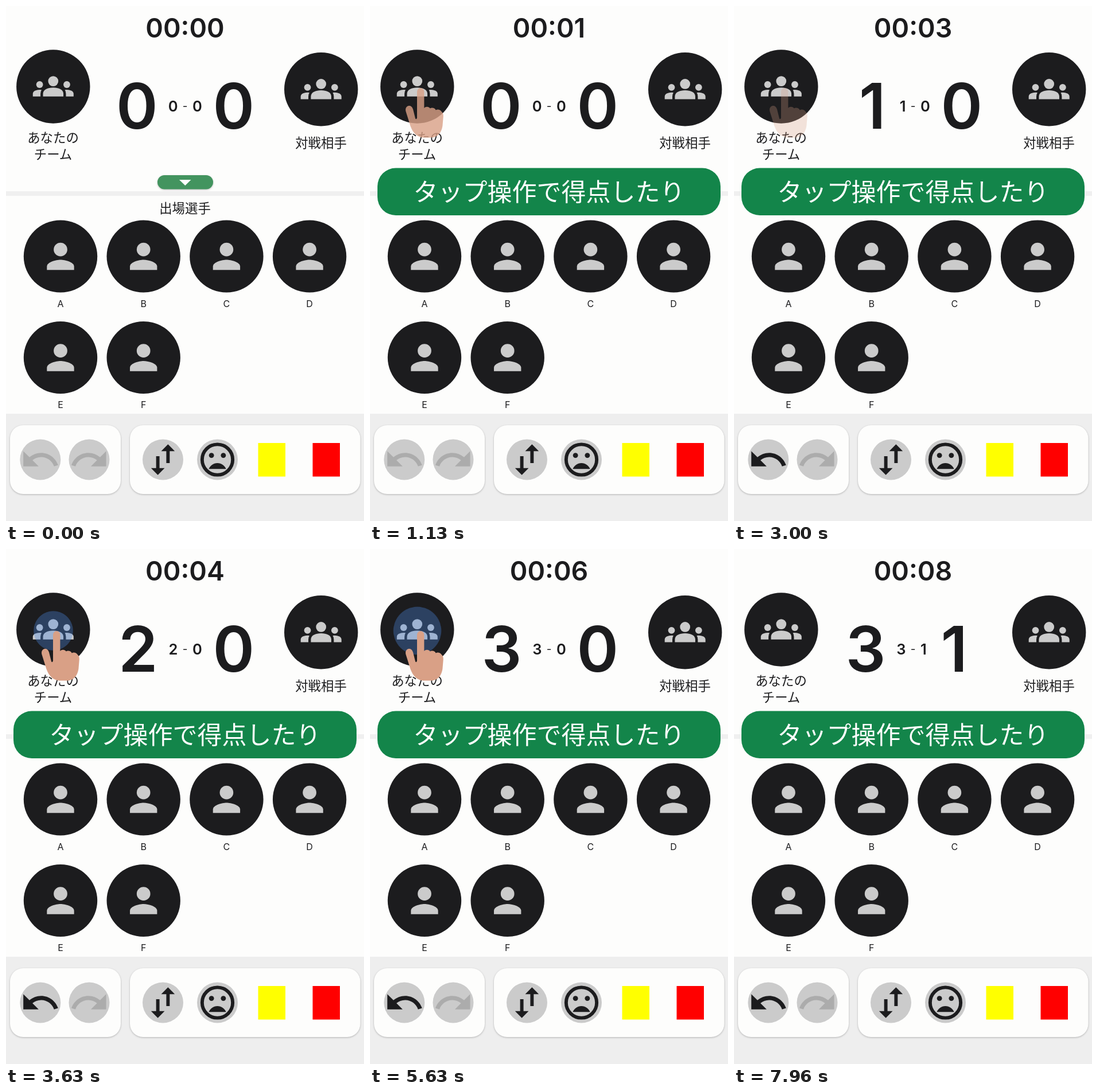
An HTML page for the animation above (8000 ms loop, 624x898 px).

```html
<!DOCTYPE html>
<html lang="ja">
<head>
<meta charset="utf-8">
<title>スコアボード</title>
<style>
  html, body { margin: 0; width: 100%; height: 100%; overflow: hidden; background: #fdfdfc; }
  svg { display: block; width: 624px; height: 898px; }
  text { font-family: Inter, "Noto Sans CJK JP", "Noto Sans CJK", sans-serif; fill: #1c1c1e; }
  .mid { text-anchor: middle; }
  .end { text-anchor: end; }
  .clock { font-size: 46.5px; font-weight: 600; }
  .big { font-size: 110px; font-weight: 600; }
  .small { font-size: 25.5px; font-weight: 600; }
  .label { font-family: "Noto Sans CJK JP", "Noto Sans CJK", sans-serif; font-size: 22.4px; font-weight: 500; }
  .name { font-size: 16px; }
  .dark { fill: #1c1c1e; }
  .grey { fill: #cbcbcb; }
  .off { fill: #acacac; }
  .raised { filter: drop-shadow(0 1.5px 1.5px rgba(0, 0, 0, .25)); }

  #banner { animation: show 8s linear infinite both; }
  #banner text { font-family: "Noto Sans CJK JP", "Noto Sans CJK", sans-serif; font-size: 43px; font-weight: 350; fill: #fff; }
  .hand { opacity: 0; animation: press 8s linear calc(var(--tap) - 600ms) infinite; }
  .ripple { opacity: 0; fill: #4a86e0; transform-box: fill-box; transform-origin: center;
    animation: grow 8s linear var(--tap) infinite, fade 8s linear var(--tap) infinite; }

  @keyframes show { 0%, 6.25% { opacity: 0 } 11.25%, 100% { opacity: 1 } }
  @keyframes press { 0% { opacity: 0 } 3.125%, 14% { opacity: 1 } 17.125%, 100% { opacity: 0 } }
  @keyframes grow {
    0% { transform: scale(.233); animation-timing-function: cubic-bezier(.215, .61, .355, 1) }
    7.5%, 100% { transform: scale(1) }
  }
  @keyframes fade { 0%, 1.875% { opacity: .35 } 7.5%, 100% { opacity: 0 } }
</style>
</head>
<body>
<svg viewBox="0 0 624 898">
  <defs>
    <g id="side">
      <circle cx="4" cy="11" r="2"/>
      <path d="M5.13 14.1Q4.6 14 4 14Q2.5 14 1.22 14.58C.48 14.9 0 15.6 0 16.43V18H4.5V16.4Q4.5 15.1 5.13 14.1Z"/>
    </g>
    <g id="team">
      <circle r="64.2" class="dark"/>
      <g class="grey" transform="translate(0 -.5) scale(2.96) translate(-12 -12)">
        <circle cx="12" cy="9" r="3"/>
        <path d="M12 12.75c1.63 0 3.07.39 4.24.9 1.08.48 1.76 1.56 1.76 2.73V18H6v-1.62c0-1.17.68-2.25 1.76-2.73 1.17-.51 2.61-.9 4.24-.9Z"/>
        <use href="#side"/>
        <use href="#side" transform="matrix(-1 0 0 1 24 0)"/>
      </g>
    </g>
    <g id="person">
      <ellipse rx="64.2" ry="63" class="dark"/>
      <g class="grey" transform="scale(2.96) translate(-12 -12)">
        <circle cx="12" cy="8" r="4"/>
        <path d="M12 14c-2.67 0-8 1.34-8 4v2h16v-2c0-2.66-5.33-4-8-4Z"/>
      </g>
    </g>
    <path id="turn" transform="scale(2.96) translate(-12 -12)" d="M12.5 8c-2.65 0-5.05.99-6.9 2.6L2 7v9h9l-3.62-3.62c1.39-1.16 3.16-1.88 5.12-1.88 3.54 0 6.55 2.31 7.6 5.5l2.37-.78C21.08 11.03 17.15 8 12.5 8Z"/>
    <circle id="knob" r="35.5" class="grey"/>
    <path id="finger" fill="#d9a086" d="M82 149.500a6.200 6.500 0 0 1 12.400 0V178c2.500-3 8-3 10.300 .5 3-2 8.500-1 10 3 3-2 8-1 10.300 3 2.500 2 3 5 2.700 9L126.500 208c-1 10-7 21.500-20 21.500H95c-13 0-20-8-24.500-20L62.500 184c-1.500-5 1-9.500 5-10 4-.5 6 2 7.500 6l4 16q1.500 3 3-1Z"/>
  </defs>

  <rect width="624" height="898" fill="#fdfdfc"/>
  <rect y="323" width="624" height="8" fill="#f0f0f0"/>
  <rect y="711" width="624" height="187" fill="#eeeeee"/>

  <text id="clock" class="clock mid" x="312" y="55">00:00</text>
  <use href="#team" x="82.300" y="140.500"/>
  <use href="#team" x="549.200" y="145.300"/>
  <text class="label mid" x="82" y="238">あなたの</text>
  <text class="label mid" x="82" y="266.500">チーム</text>
  <text class="label mid" x="549" y="247">対戦相手</text>

  <text class="big end home" x="264.500" y="214">0</text>
  <text class="big away" x="360.500" y="214">0</text>
  <text class="small end home" x="299.500" y="184">0</text>
  <text class="mid" x="312" y="181" font-size="19">-</text>
  <text class="small away" x="325" y="184">0</text>

  <rect class="raised" x="264" y="295" width="97" height="24.500" rx="12.200" fill="#43945f"/>
  <path d="M302 303h20.500l-10.200 10Z" fill="#fff"/>
  <text class="label mid" x="312" y="360.500">出場選手</text>
  <g id="players"></g>

  <g class="raised" fill="#fdfdfc">
    <rect x="7" y="731" width="193" height="120" rx="23"/>
    <rect x="216" y="731" width="401.500" height="120" rx="23"/>
  </g>
  <g transform="translate(59.800 791)"><use href="#knob"/><use id="undo" href="#turn" class="off"/></g>
  <g transform="translate(145 791)"><use href="#knob"/><use href="#turn" class="off" transform="scale(-1 1)"/></g>
  <g transform="translate(273.500 791)">
    <use href="#knob"/>
    <path class="dark" transform="scale(-2.96 2.96) translate(-12 -12)" d="M16 17.010V10h-2v7.010h-3L15 21l4-3.990ZM9 3L5 6.990h3V14h2V6.990h3Z"/>
  </g>
  <g transform="translate(368.500 791)">
    <use href="#knob"/>
    <g class="dark" transform="scale(2.96) translate(-12 -12)">
      <circle cx="12" cy="12" r="9" fill="none" stroke="#1c1c1e" stroke-width="2"/>
      <circle cx="8.500" cy="9.500" r="1.500"/>
      <circle cx="15.500" cy="9.500" r="1.500"/>
      <path d="M12 14c-2.330 0-4.310 1.460-5.110 3.500h10.220c-.8-2.040-2.780-3.500-5.110-3.500Z"/>
    </g>
  </g>
  <rect x="439.500" y="762" width="47.500" height="58.500" fill="#ff0"/>
  <rect x="534.500" y="762" width="47.500" height="58.500" fill="#f00"/>

  <g id="taps"></g>
  <g id="banner">
    <rect x="13" y="282.500" width="598" height="82.500" rx="32" fill="#13854a"/>
    <text class="mid" x="312" y="339.500">タップ操作で得点したり</text>
  </g>
</svg>
<script>
  const LOOP = 8000;
  const CLOCK_OFFSET = 500;
  const TAPS = [
    { at: 1530, side: 'home' },
    { at: 3530, side: 'home' },
    { at: 5480, side: 'home' },
    { at: 6850, side: 'away' }
  ];
  const byId = id => document.getElementById(id);
  const setText = (el, value) => { if (el.textContent !== value) el.textContent = value; };

  byId('players').innerHTML = [...'ABCDEF'].map((name, i) => {
    const x = 95 + (i % 4) * 144.7;
    const y = 436.5 + Math.floor(i / 4) * 176.5;
    return `<use href="#person" x="${x}" y="${y}"/><text class="name mid" x="${x}" y="${y + 88}">${name}</text>`;
  }).join('');

  byId('taps').innerHTML = TAPS.map(({ at, side }) => `
    <g transform="translate(${side === 'home' ? 0 : 468.5} 0)" style="--tap:${at}ms">
      <circle class="ripple" cx="82.500" cy="142.500" r="60"/>
      <use class="hand" href="#finger"/>
    </g>`).join('');

  // The banner's animation serves as the shared clock for the counters.
  const timeline = byId('banner').getAnimations()[0];

  function update() {
    const t = (timeline.currentTime || 0) % LOOP;
    const seconds = Math.floor((t + CLOCK_OFFSET) / 1000);
    setText(byId('clock'), '00:' + String(seconds).padStart(2, '0'));
    for (const side of ['home', 'away']) {
      const score = TAPS.filter(tap => tap.side === side && tap.at <= t).length;
      document.querySelectorAll('.' + side).forEach(el => setText(el, String(score)));
    }
    byId('undo').setAttribute('class', t >= TAPS[0].at ? 'dark' : 'off');
    requestAnimationFrame(update);
  }
  update();
</script>
</body>
</html>
```
